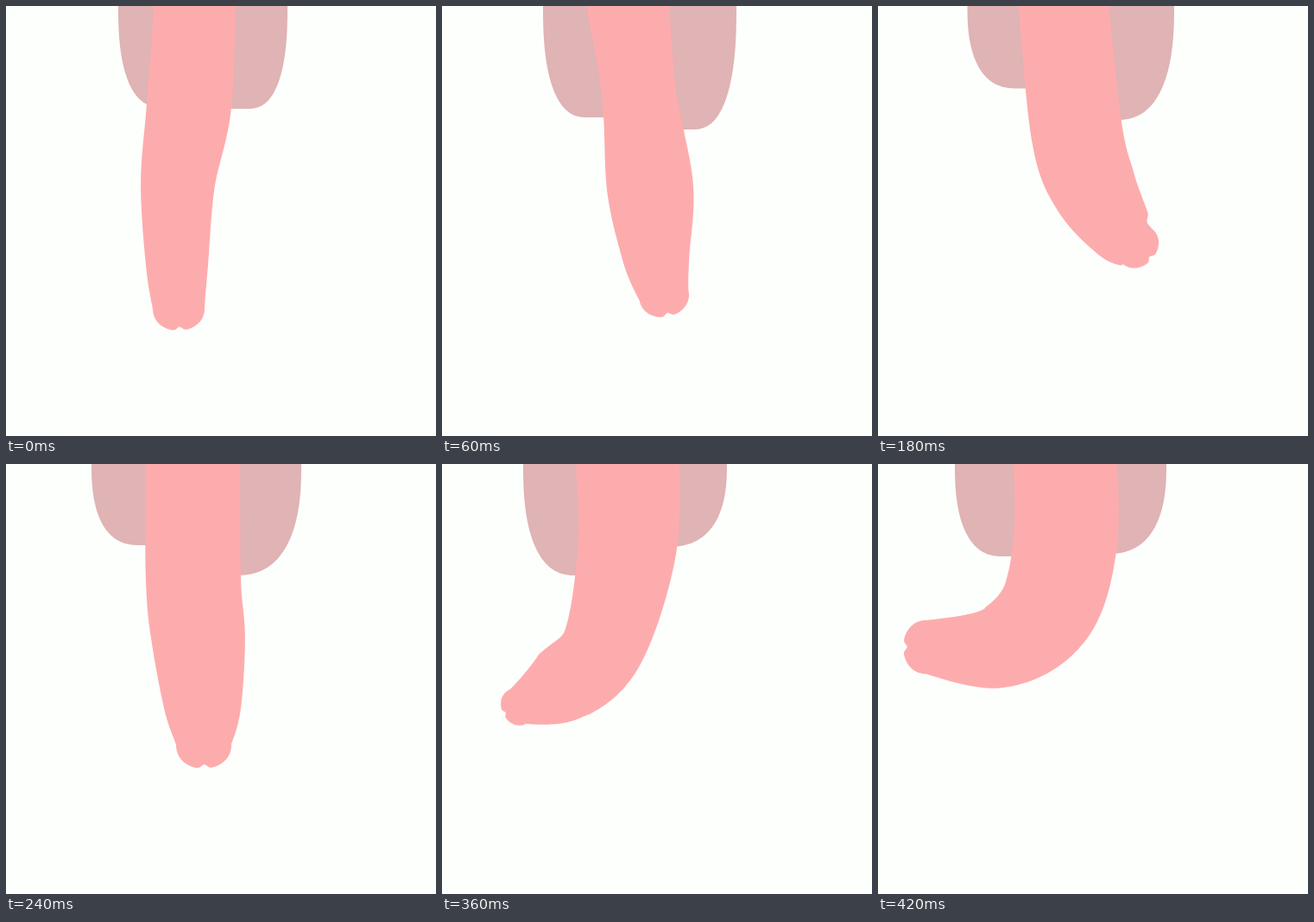
Animation of 498x498 px, one loop 0.48 s. Source, as an HTML page with a canvas:

```html
<!DOCTYPE html>
<html lang="en">
<head>
<meta charset="utf-8">
<title>Swing</title>
<style>
html, body { margin: 0; width: 100%; height: 100%; overflow: hidden; background: #fdfffd; }
canvas { display: block; width: 100vw; height: 100vh; }
</style>
</head>
<body>
<canvas width="498" height="498"></canvas>
<script>
const STEP = 60;
const SIZE = 498;
const TOP = -5;
const ctx = document.querySelector('canvas').getContext('2d');

// spine: key points [x, y, half width]; lobes: [outer x, bottom y, center x]
const pose = (spine, left, right) => ({ spine, left, right });
const mix = (a, b) => Array.isArray(a) ? a.map((v, i) => mix(v, b[i])) : (a + b) / 2;
const between = (a, b) =>
  pose(mix(a.spine, b.spine), mix(a.left, b.left), mix(a.right, b.right));

const hang = pose(
  [[219, TOP, 47], [212, 115, 49], [199, 205, 43], [198, 300, 36], [200, 350, 30]],
  [130, 117, 180], [326, 119, 280]);
const leanRight = pose(
  [[215, TOP, 48], [228, 100, 43], [241, 210, 50], [248, 290, 39], [257, 335, 29]],
  [117, 129, 168], [341, 143, 290]);
const farRight = pose(
  [[213, TOP, 49], [243, 155, 51], [276, 214, 46], [336, 239, 32], [371, 231, 21]],
  [108, 97, 168], [344, 135, 285]);
const middle = pose(
  [[216, TOP, 55], [217, 135, 55], [223, 205, 54], [228, 285, 44], [229, 325, 32]],
  [99, 94, 155], [342, 129, 265]);
const leanLeft = pose(
  [[215, TOP, 60], [214, 100, 57], [186, 212, 48], [137, 257, 44], [88, 281, 22]],
  [94, 129, 155], [330, 96, 260]);
const farLeft = pose(
  [[217, TOP, 60], [217, 90, 60], [195, 170, 57], [138, 212, 48], [56, 212, 31]],
  [89, 107, 145], [334, 104, 265]);

const cycle = [hang, leanRight, farRight, between(farRight, middle),
  middle, between(middle, leanLeft), leanLeft, farLeft];

// Catmull-Rom interpolation of the key points, t from 0 to keys.length - 1.
function along(keys, t) {
  const last = keys.length - 1;
  const i = Math.min(Math.floor(t), last - 1);
  const u = t - i;
  const [a, b, c, d] = [i - 1, i, i + 1, i + 2]
    .map(k => keys[Math.max(0, Math.min(last, k))]);
  return b.map((p, k) => p + u / 2 * (c[k] - a[k]
    + u * (2 * a[k] - 5 * p + 4 * c[k] - d[k]
    + u * (3 * (p - c[k]) + d[k] - a[k]))));
}

function fill(points, color) {
  ctx.fillStyle = color;
  ctx.beginPath();
  points.forEach(p => ctx.lineTo(...p));
  ctx.fill();
}

// A tapering tube around the spine, with a rounded, slightly notched end.
function drawBody(spine) {
  const end = spine.length - 1;
  const one = [], other = [], cap = [];
  let x, y, w, dx, dy;
  for (let i = 0; i <= 80; i++) {
    const t = end * i / 80;
    [x, y, w] = along(spine, t);
    const from = along(spine, Math.max(0, t - 0.02));
    const to = along(spine, Math.min(end, t + 0.02));
    const angle = Math.atan2(to[1] - from[1], to[0] - from[0]);
    dx = Math.cos(angle);
    dy = Math.sin(angle);
    one.push([x - dy * w, y + dx * w]);
    other.unshift([x + dy * w, y - dx * w]);
  }
  for (let i = 1; i < 40; i++) {
    const angle = Math.PI * i / 40;
    const notch = 1 - 0.18 * Math.exp(-(((angle - Math.PI / 2) / 0.14) ** 2));
    const side = w * Math.cos(angle);
    const ahead = 0.87 * w * notch * Math.sin(angle) ** 0.9;
    cap.push([x - dy * side + dx * ahead, y + dx * side + dy * ahead]);
  }
  fill([...one, ...cap, ...other], '#fdacad');
}

// A superellipse quarter that runs on behind the body.
function drawLobe([outer, bottom, center]) {
  const points = [[SIZE * 0.43, TOP], [outer, TOP]];
  for (let i = 0; i <= 40; i++) {
    const angle = Math.PI / 2 * i / 40;
    points.push([
      center + (outer - center) * Math.abs(Math.cos(angle)) ** 0.8,
      bottom * Math.sin(angle) ** 0.8]);
  }
  fill([...points, [SIZE * 0.43, bottom]], '#e0b3b4');
}

function draw(now) {
  const { spine, left, right } = cycle[Math.floor(now / STEP) % cycle.length];
  ctx.fillStyle = '#fdfffd';
  ctx.fillRect(0, 0, SIZE, SIZE);
  drawLobe(left);
  drawLobe(right);
  drawBody(spine);
}

const start = performance.now();
function tick() {
  draw(performance.now() - start);
  requestAnimationFrame(tick);
}
tick();
</script>
</body>
</html>
```
